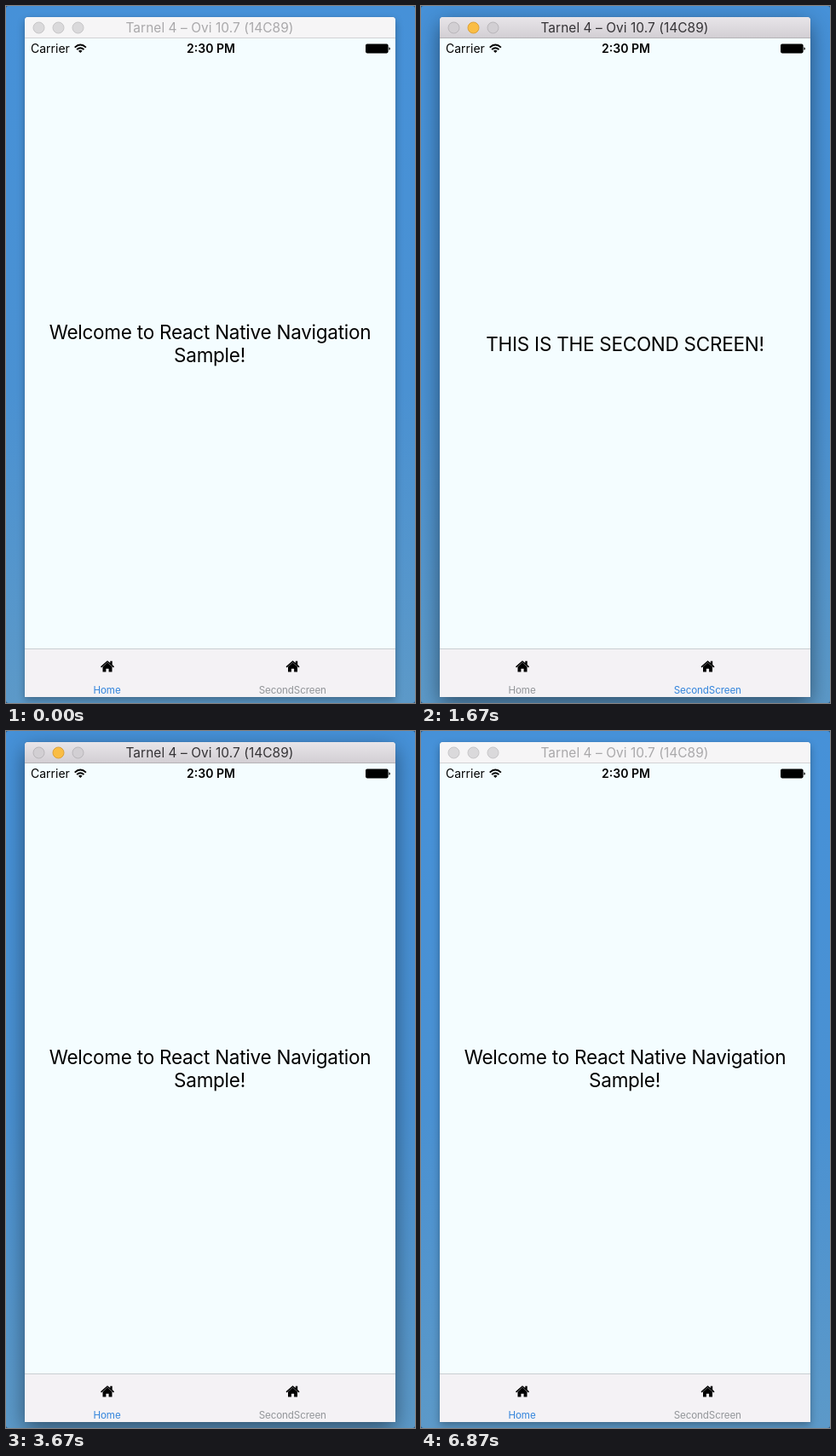
These frames come from a looping animation (480x818 px, 6.94 s). An HTML page:

```html
<!DOCTYPE html>
<html lang="en">
<head>
<meta charset="utf-8">
<title>Tab navigation</title>
<style>
  html, body { margin: 0; width: 100%; height: 100%; overflow: hidden; background: #24527f; }
  #stage { position: relative; width: 480px; height: 818px; overflow: hidden; border-radius: 3px;
    background: linear-gradient(#4691d8, #4a91d2 55%, #5c99c8); }
  #window { position: absolute; left: 22px; top: 13px; width: 435px; height: 798px;
    border-radius: 4px 4px 0 0; background: #f4fdff;
    box-shadow: 0 0 1px rgba(0,0,0,.25), 0 4px 10px rgba(0,0,0,.3); }
  .active #window { box-shadow: 0 0 1px rgba(0,0,0,.3), 0 8px 25px rgba(0,0,0,.46); }
  svg { position: absolute; left: 0; top: 0; }
  text { font-family: Inter, Roboto, sans-serif; fill: #000; }
  .mid { text-anchor: middle; }
  .title { font-size: 15.4px; letter-spacing: .08px; fill: #a9a8aa; }
  .active .title { fill: #343235; }
  .bar { fill: #f6f5f6; }
  .active .bar { fill: url(#chrome); }
  .rule { fill: #d3d2d4; }
  .active .rule { fill: #b5b2b6; }
  .light { fill: #dad9db; stroke: #c7c6c8; }
  .active .light { fill: #d2cfd3; stroke: #b9b6ba; }
  .active .minimize { fill: #fabd44; stroke: #dda136; }
  .status { font-size: 14px; }
  .clock { font-weight: 600; }
  .message { font-size: 22.5px; letter-spacing: -.25px; }
  .tab { font-size: 11.6px; letter-spacing: -.1px; fill: #929599; }
  .home .home-tab, .second .second-tab { fill: #3284dc; }
  .home .second-view, .second .home-view { display: none; }
</style>
</head>
<body>
<div id="stage" class="home">
  <div id="window"></div>
  <svg width="480" height="818" viewBox="0 0 480 818">
    <defs>
      <linearGradient id="chrome" x2="0" y2="1">
        <stop stop-color="#e8e5e9"/><stop offset="1" stop-color="#d2ced3"/>
      </linearGradient>
      <g id="house">
        <path d="M-8 .3 0-6.8 3.3-4V-6.3H5.7V-1.9L8 .3 7 1.4 0-4.8-7 1.4Z"/>
        <path d="M-5.5 .6 0-4.4 5.5 .6V6.6H1.6V2.7H-1.6V6.6H-5.5Z"/>
      </g>
    </defs>

    <path class="bar" d="M22 38V17q0-4 4-4H453q4 0 4 4V38Z"/>
    <rect class="rule" x="22" y="37" width="435" height="1"/>
    <circle class="light" cx="38.5" cy="25.5" r="6.5"/>
    <circle class="light minimize" cx="61.5" cy="25.5" r="6.5"/>
    <circle class="light" cx="84.5" cy="25.5" r="6.5"/>
    <text class="title mid" x="239" y="31">Tarnel 4 – Ovi 10.7 (14C89)</text>

    <text class="status" x="29" y="55">Carrier</text>
    <g fill="none" stroke="#000" stroke-width="1.9">
      <path d="M80.7 48.6Q87.3 42.6 93.9 48.6"/>
      <path d="M83.1 51.1Q87.3 47.3 91.5 51.1"/>
    </g>
    <path d="M85 52.7Q87.3 50.8 89.6 52.7L87.3 55Z"/>
    <text class="status clock mid" x="240.5" y="55">2:30 PM</text>
    <rect x="422" y="44.6" width="26.6" height="10.8" rx="1.8"/>
    <path d="M449.4 48.2q1.5 .4 1.5 1.8t-1.5 1.8Z"/>

    <g class="home-view message mid">
      <text x="239.5" y="391">Welcome to React Native Navigation</text>
      <text x="239" y="418">Sample!</text>
    </g>
    <text class="second-view message mid" x="239.5" y="405">THIS IS THE SECOND SCREEN!</text>

    <rect x="22" y="754" width="435" height="57" fill="#f4f2f5"/>
    <rect x="22" y="754" width="435" height="1" fill="#c9ced2"/>
    <use href="#house" x="119" y="775"/>
    <use href="#house" x="336.5" y="775"/>
    <text class="tab home-tab mid" x="118.5" y="807">Home</text>
    <text class="tab second-tab mid" x="336.3" y="807">SecondScreen</text>
  </svg>
</div>
<script>
  const LOOP = 6940;
  const FOCUS = 600, BLUR = 6530;
  const TAPS = [730, 1870, 2730, 3600, 4600, 5470];
  const stage = document.getElementById('stage');

  function draw(now) {
    const t = now % LOOP;
    const taps = TAPS.filter(tap => tap <= t).length;
    const view = taps % 2 ? 'second' : 'home';
    const focused = t >= FOCUS && t < BLUR;
    stage.className = focused ? view + ' active' : view;
  }

  const start = performance.now();
  function tick() {
    draw(performance.now() - start);
    requestAnimationFrame(tick);
  }
  tick();
</script>
</body>
</html>
```
